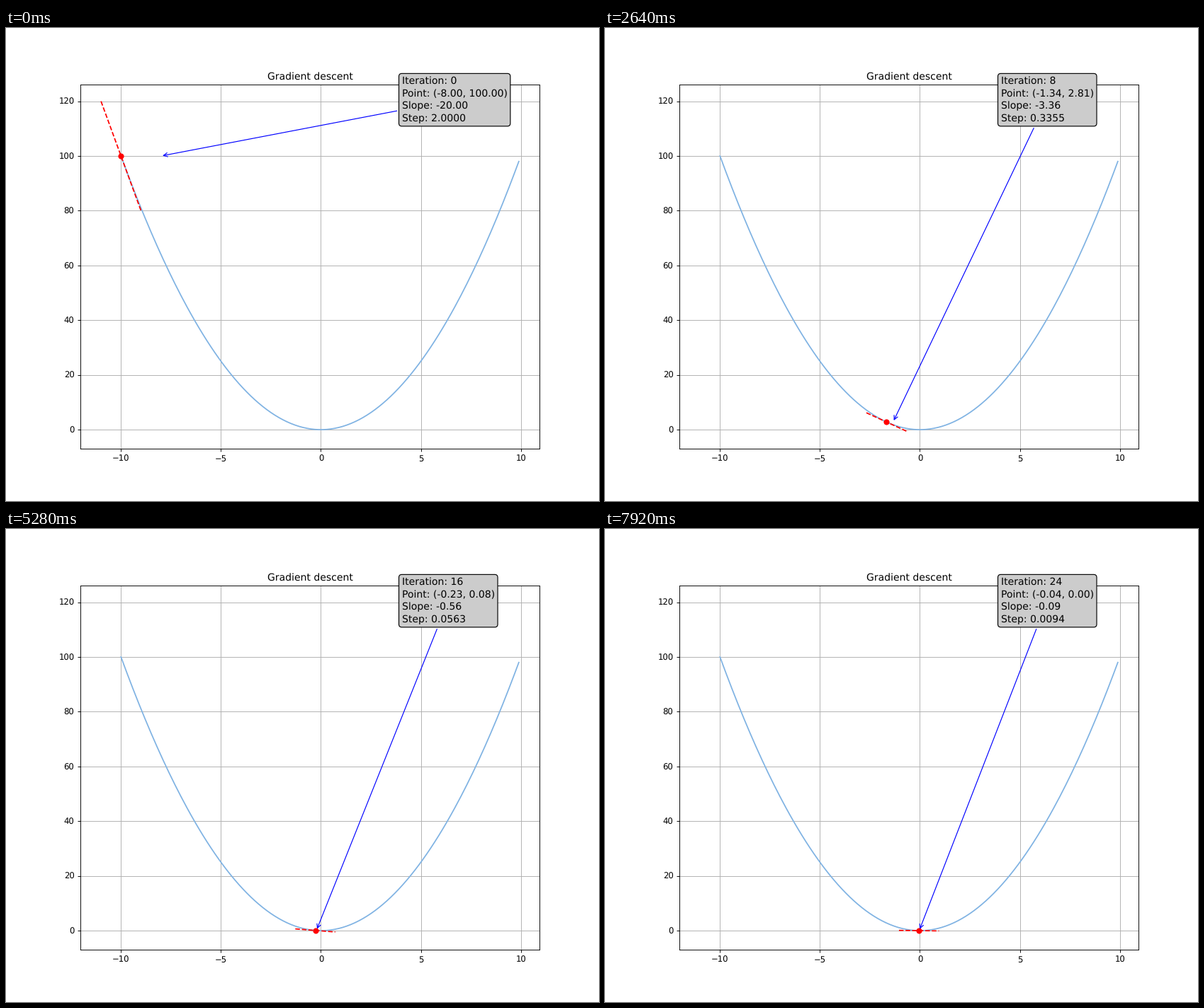
Recreate the animation shown at these times as a matplotlib script. Size 837 by 669 pixels, loop 8000 ms.

```python
import matplotlib.pyplot as plt
import numpy as np
from matplotlib.animation import FuncAnimation

W, H, DPI = 837, 669, 84
INTERVAL, FRAMES = 40, 200
STEP_MS = 330
START, RATE = -10.0, 0.1

plt.rcParams.update({"font.size": 9.964, "text.hinting": "none"})


def f(x):
    return x ** 2


def slope_at(x):
    return 2 * x


fig, ax = plt.subplots(figsize=((W + 1e-3) / DPI, (H + 1e-3) / DPI), dpi=DPI)
fig.subplots_adjust(left=0.125, right=0.9, bottom=0.11, top=0.88)

xs = np.arange(-10, 10, 0.1)
ax.plot(xs, f(xs), color="#80b3e3")
tangent, = ax.plot([], [], "r--")
point, = ax.plot([], [], "ro")
ax.set_xlim(-12.045, 10.945)
ax.set_ylim(-7.06, 126.03)
ax.set_title("Gradient descent")
ax.grid(True)

note = ax.annotate(
    "", xy=(0, 0), xytext=(0.7, 0.9), textcoords="axes fraction",
    size="large", linespacing=1.375,
    bbox=dict(boxstyle="round", fc="0.8"),
    arrowprops=dict(arrowstyle="->", color="blue"))


def update(i):
    # a tick shows the iteration that begins anywhere inside it
    n = (i * INTERVAL + INTERVAL - 1) // STEP_MS
    x = START * (1 - 2 * RATE) ** n
    y, slope = f(x), slope_at(x)
    step = -RATE * slope
    new_x = x + step

    tangent.set_data([x - 1, x + 1], [y - slope, y + slope])
    point.set_data([x], [y])
    note.xy = (new_x, y)
    note.set_text(f"Iteration: {n}\n"
                  f"Point: ({new_x:.2f}, {y:.2f})\n"
                  f"Slope: {slope:.2f}\n"
                  f"Step: {step:.4f}")
    return tangent, point, note


anim = FuncAnimation(fig, update, frames=FRAMES, interval=INTERVAL,
                     repeat=True, repeat_delay=0)
plt.show()
```
